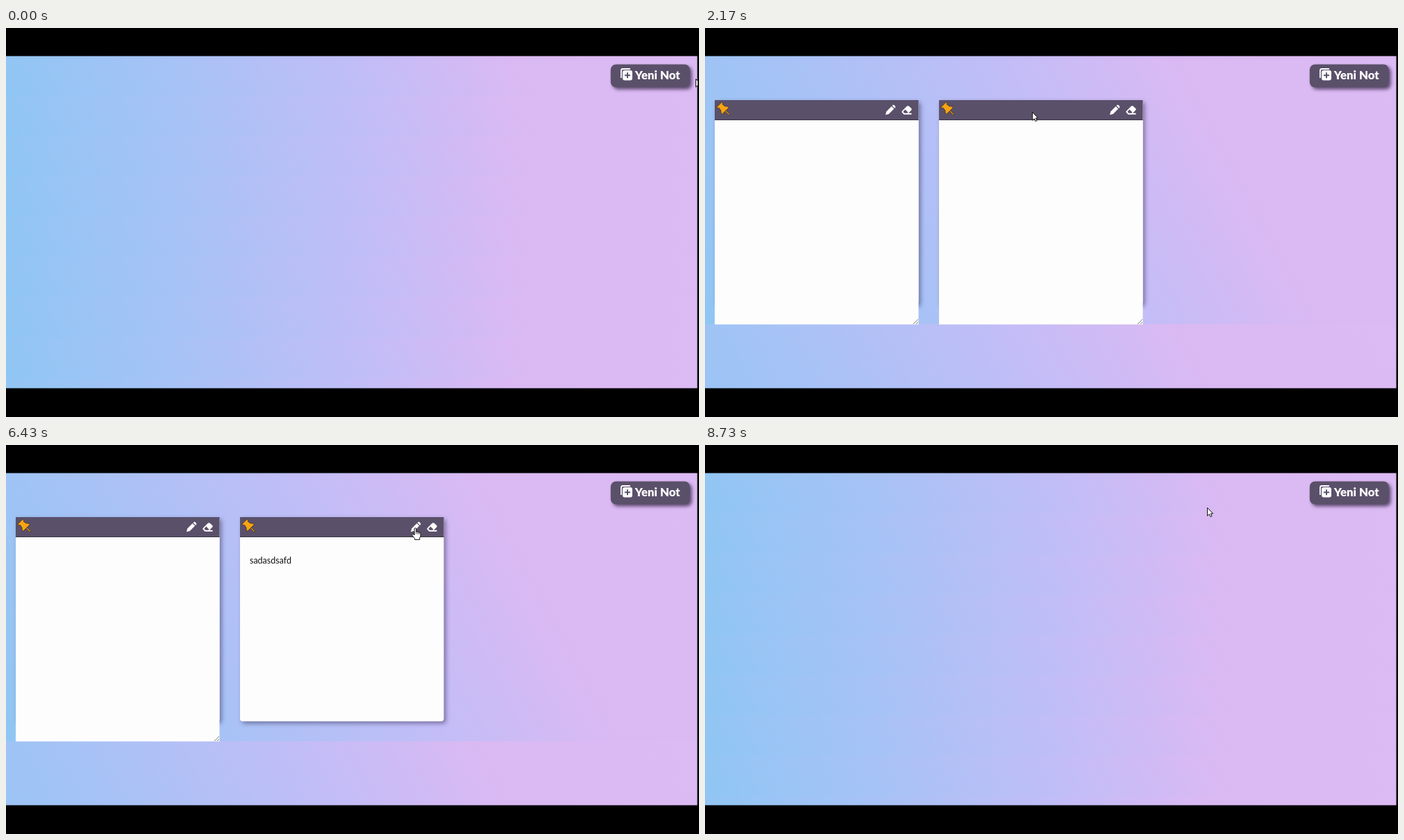
An HTML page for the animation above (8.76 s loop, 998x561 px).

```html
<!DOCTYPE html>
<html lang="tr">
<head>
<meta charset="utf-8">
<title>Notlar</title>
<style>
  html, body { margin: 0; width: 100%; height: 100%; overflow: hidden; background: #000; }
  #page {
    --tile: 58px;
    position: absolute; left: 0; top: 40px; width: 996px; height: 480px;
    clip-path: inset(.5px .5px .5px 0);
    background: linear-gradient(62deg, #8fc6f3, #a8c2f6 27%, #c2bdf7 52%, #dab9f3 73%, #dcbaf3) 0 1px / 996px var(--tile);
  }
  #page.tall { --tile: 386px; }
  svg { position: absolute; left: 0; top: 0; width: 998px; height: 561px; }
  text { font-family: Lato, "Open Sans", sans-serif; white-space: pre; }
  .shadow { filter: drop-shadow(3px 3px 3px rgba(30, 20, 60, .45)); }
  .button { filter: drop-shadow(3px 3px 2.5px rgba(25, 15, 45, .65)); }
</style>
</head>
<body>
<div id="page"></div>
<svg viewBox="0 0 998 561">
  <defs>
    <clipPath id="screen"><rect y="40" width="996" height="480"/></clipPath>
    <g id="pin" transform="rotate(-45)" fill="#f7a414" stroke="#47361f" stroke-width=".8" stroke-linejoin="round">
      <path d="M-.9 3H.9V10L0 12L-.9 10Z"/>
      <path d="M-5-9.5H5V-7H3.6L4.2-2Q7 0 7 3.2H-7Q-7 0-4.2-2L-3.6-7H-5Z"/>
    </g>
    <g id="pencil" fill="#fff">
      <path d="M0 14.5L1.2 9.7L8.6 2.3L12.2 5.9L4.8 13.3Z"/>
      <path d="M9.5 1.4L10.3.6Q11.4-.4 12.5.6L13.9 2Q14.9 3.1 13.9 4.2L13.1 5Z"/>
    </g>
    <g id="eraser">
      <path fill="#fff" d="M7.5 2.5L1.3 8.7Q.2 9.9 1.3 11.1L4 13.8H15V11.8H10.5L14.7 7.5Q15.7 6.3 14.7 5.1L11.2 1.8Q9.6.6 7.5 2.5Z"/>
      <path fill="#5a506a" d="M5.8 6.5L10 10.7L8.8 11.8H4.8L2.8 9.9Z"/>
    </g>
    <g id="arrow">
      <path fill="#fff" stroke="#111" d="M.5.5V12.2L3.2 9.7L5 13.5L7 12.6L5.2 8.9H8.6Z"/>
    </g>
    <g id="hand">
      <path fill="#fff" stroke="#111" stroke-linejoin="round" d="M-.9 10V1Q-.9-.3.4-.3T1.7 1V5.2Q2.8 4.4 3.9 5.5Q5.1 4.9 5.9 6.1Q8 5.9 8 7.7V11Q7.8 13 6.7 14V16.5H-.3V15L-3.7 10.7Q-4.5 9-3.2 8.4Q-2.2 8.1-.9 10Z"/>
      <path fill="none" stroke="#111" stroke-width=".7" d="M1.7 5V8.5M3.9 5.6V8.7M5.9 6.2V8.9"/>
    </g>
    <g id="beam">
      <path fill="none" stroke="#111" d="M-2.5-7.5H-.5L0-7L.5-7.5H2.5M0-7V7M-2.5 7.5H-.5L0 7L.5 7.5H2.5"/>
    </g>
  </defs>

  <g>
    <rect class="button" x="870.8" y="52.5" width="114" height="33" rx="7.5" fill="#5a506a"/>
    <path fill="none" stroke="#fff" stroke-width="1.8" d="M885.9 72V61.5Q885.9 59 888.4 59H899"/>
    <rect x="888" y="61" width="14" height="14.5" rx="3" fill="#fff"/>
    <path stroke="#5a506a" stroke-width="2" d="M895 64.3V72.3M891 68.3H899"/>
    <text x="905.7" y="74.3" font-size="16.8" font-weight="900" fill="#fff">Yeni Not</text>
  </g>
  <g id="notes"></g>
  <text id="typed" x="351" fill="#111"></text>
  <path id="caret" stroke="#111" stroke-width="1.2" d="M0 149V165"/>
  <g clip-path="url(#screen)"><use id="cursor"/></g>
</svg>
<script>
const LOOP = 8760;
const NOTE_STEP = 323;
const WORD = 'sadasdsafd';
const FOCUS = 2700, FIRST_KEY = 3100, LAST_KEY = 4300, SAVE = 5300;
const lives = [[780, 8260], [1380, 7560]];

// Pointer tip: time, x, y
const path = [
  [0, 993, 73], [600, 944, 77], [1600, 944, 77], [2170, 471, 121],
  [2600, 440, 180], [4400, 440, 180], [4730, 534, 133], [5120, 589, 120],
  [6700, 589, 120], [7150, 613, 114], [7650, 613, 114], [8100, 289, 117],
  [8340, 289, 117], [8730, 723, 90], [LOOP, 723, 90]
];

const $ = id => document.getElementById(id);
const page = $('page'), typed = $('typed'), caret = $('caret'), cursor = $('cursor');
const show = (el, on) => el.setAttribute('visibility', on ? 'visible' : 'hidden');

$('notes').innerHTML = lives.map((_, i) => `
  <g class="note" transform="translate(${i * NOTE_STEP})">
    <rect class="shadow" x="14" y="104" width="293.5" height="294.5" rx="4" fill="#fdfdfd"/>
    <g class="editor">
      <rect x="14" y="130" width="293.5" height="297.5" fill="#fdfdfd"/>
      <path d="M300 427L307 420M304 427L307 424" stroke="#777" stroke-width=".9"/>
    </g>
    <rect x="14" y="104" width="293.5" height="29" fill="#5a506a"/>
    <path d="M14 132.5H307.5" stroke="#39333f"/>
    <use href="#pin" transform="translate(27.3 117.3)"/>
    <use href="#pencil" x="260" y="110.7"/>
    <use href="#eraser" x="282.5" y="111"/>
  </g>`).join('');
const notes = [...document.querySelectorAll('.note')];
const editors = [...document.querySelectorAll('.editor')];

function pointerAt(t) {
  const i = path.findIndex(p => p[0] > t);
  const [t0, x0, y0] = path[i - 1], [t1, x1, y1] = path[i];
  const u = (t - t0) / (t1 - t0), e = u * u * (3 - 2 * u);
  return [x0 + (x1 - x0) * e, y0 + (y1 - y0) * e];
}

function cursorKind(x, y, alive, editing) {
  const inside = (l, top, r, b) => x >= l && x <= r && y >= top && y <= b;
  if (inside(871, 53, 985, 86)) return 'hand';
  for (let i = 0; i < alive.length; i++) {
    const dx = i * NOTE_STEP;
    if (!alive[i]) continue;
    if (inside(259 + dx, 110, 275 + dx, 126) || inside(282 + dx, 110, 299 + dx, 126)) return 'hand';
    if (editing[i] && inside(14 + dx, 134, 307 + dx, 427)) return 'beam';
  }
  return 'arrow';
}

function draw(t) {
  const alive = lives.map(([from, to]) => t >= from && t < to);
  const editing = [true, t < SAVE];
  page.className = alive.some(Boolean) ? 'tall' : '';
  notes.forEach((note, i) => {
    note.style.display = alive[i] ? '' : 'none';
    editors[i].style.display = editing[i] ? '' : 'none';
  });

  const keyGap = (LAST_KEY - FIRST_KEY) / (WORD.length - 1);
  const count = Math.max(0, Math.min(WORD.length, Math.floor((t - FIRST_KEY) / keyGap + 1.001)));
  typed.textContent = WORD.slice(0, count);
  typed.setAttribute('font-size', editing[1] ? 15 : 12.5);
  typed.setAttribute('y', editing[1] ? 161 : 171);
  show(typed, alive[1]);

  const lastInput = count ? FIRST_KEY + (count - 1) * keyGap : FOCUS;
  show(caret, t >= FOCUS && t < SAVE && (t - lastInput) % 1060 < 530);
  const width = count ? typed.getComputedTextLength() : 0;
  caret.setAttribute('transform', `translate(${351.5 + width})`);

  const [x, y] = pointerAt(t);
  cursor.setAttribute('href', '#' + cursorKind(x, y, alive, editing));
  cursor.setAttribute('transform', `translate(${Math.round(x)} ${Math.round(y)})`);
}

const start = performance.now();
function tick() {
  draw((performance.now() - start) % LOOP);
  requestAnimationFrame(tick);
}
tick();
</script>
</body>
</html>
```
